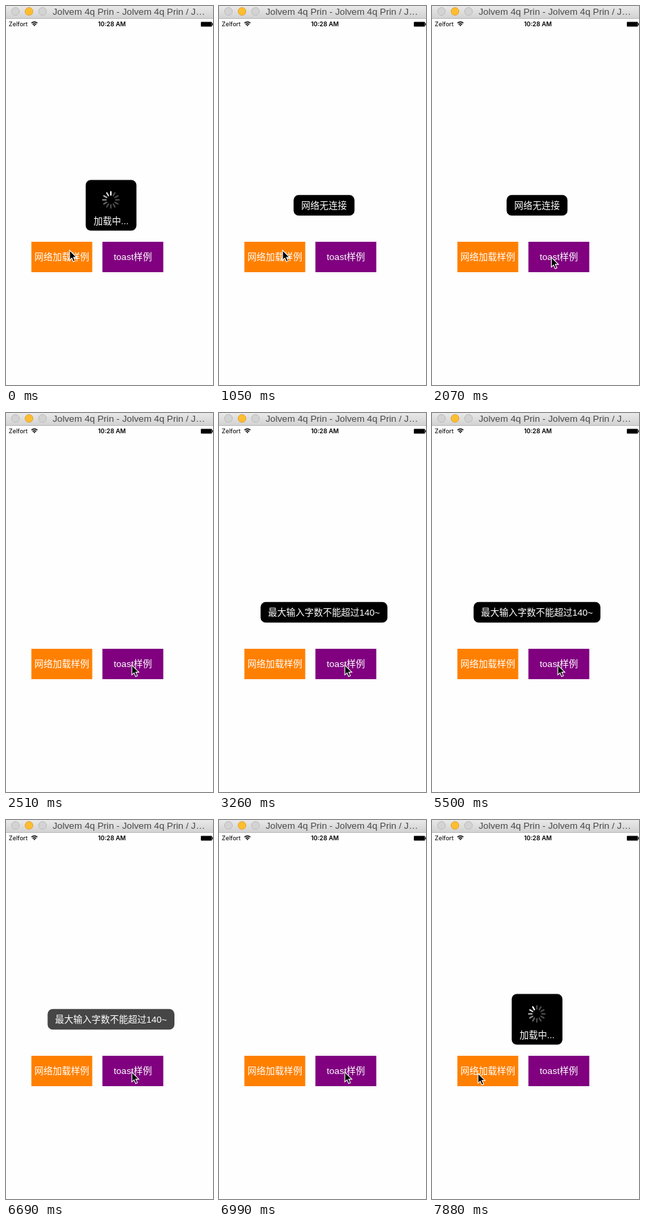
Recreate the animation shown at these times as an HTML page. Size 306x561 px, loop 8 s.

```html
<!DOCTYPE html>
<html lang="zh-CN">
<head>
<meta charset="utf-8">
<title>Toast</title>
<style>
html, body { margin: 0; width: 100%; height: 100%; overflow: hidden; background: #fefefe; }
svg { display: block; }
text { font: 13.5px "Liberation Sans", "Noto Sans CJK SC", "Noto Sans CJK", sans-serif; fill: #fff; text-anchor: middle; }
.bar text { font-size: 13.7px; fill: #484848; text-anchor: start; }
.status text { font: 9px Inter, sans-serif; fill: #000; }
</style>
</head>
<body>
<svg width="306" height="561" viewBox="0 0 306 561">
  <defs>
    <linearGradient id="chrome" x2="0" y2="1">
      <stop stop-color="#e9e9e9"/><stop offset="1" stop-color="#d1d1d1"/>
    </linearGradient>
  </defs>

  <g class="bar">
    <rect width="306" height="19" fill="url(#chrome)"/>
    <rect y="18" width="306" height="1" fill="#b9b9b9"/>
    <g fill="#d3d3d3" stroke="#bcbcbc">
      <circle cx="14" cy="8" r="5.8"/>
      <circle cx="34" cy="8" r="5.8" fill="#fdbd30" stroke="#e2a336"/>
      <circle cx="54" cy="8" r="5.8"/>
    </g>
    <text x="69" y="13">Jolvem 4q Prin - Jolvem 4q Prin / J…</text>
  </g>

  <g class="status">
    <text x="4" y="30" style="text-anchor:start">Zelfort</text>
    <g fill="none" stroke="#000" stroke-width="1.5">
      <path d="M37.6 25.3Q42 21.6 46.4 25.3M39.4 27.3Q42 25.2 44.6 27.3"/>
      <path d="M40.4 28.3Q42 27 43.6 28.3L42 30Z" fill="#000" stroke="none"/>
    </g>
    <text x="156.5" y="30" style="font-weight:600">10:28 AM</text>
    <rect x="288" y="23.5" width="16.5" height="7" rx="1"/>
    <rect x="305" y="25.5" width="1" height="3"/>
  </g>

  <rect x="37.5" y="349" width="90" height="45" fill="#ff8000"/>
  <text x="82.5" y="376">网络加载样例</text>
  <rect x="142.5" y="349" width="90" height="45" fill="#800080"/>
  <text x="187.5" y="376">toast样例</text>

  <g id="loader">
    <rect x="117.8" y="257.5" width="75" height="75" rx="7.5"/>
    <g id="spinner" transform="translate(155 287)" stroke="#fff" stroke-width="2.1" stroke-linecap="round"></g>
    <text x="155.3" y="322.5">加载中...</text>
  </g>
  <g id="offline">
    <rect x="110.3" y="279.7" width="90" height="30.6" rx="7.5"/>
    <text x="155.3" y="300">网络无连接</text>
  </g>
  <g id="limit">
    <rect x="61.5" y="279.7" width="187.5" height="30.6" rx="7.5"/>
    <text x="155.3" y="300">最大输入字数不能超过140~</text>
  </g>

  <path id="cursor" d="M0 0V14.6L3.3 11.6L5.6 17L8.2 15.9L5.9 10.6H10.4Z" stroke="#fff" stroke-width="1.1"/>
</svg>
<script>
const LOOP = 8000, STEP = 150, HOLD = 1190;
const marks = [0, 1490, 2510, 3260, 4450, 5500, 6690, 7430, 7730];
const el = id => document.getElementById(id);
const clamp = v => Math.min(1, Math.max(0, v));
const ease = (t, from, to) => {
  const p = clamp((t - from) / (to - from));
  return p * p * (3 - 2 * p);
};

const spokes = Array.from({ length: 12 }, (_, i) => {
  const line = document.createElementNS("http://www.w3.org/2000/svg", "line");
  line.setAttribute("y1", -7.2);
  line.setAttribute("y2", -12);
  line.setAttribute("transform", `rotate(${i * 30})`);
  el("spinner").append(line);
  return line;
});

// The screen updates in steps, counted anew from each mark.
function snap(t) {
  const mark = marks.findLast(m => m <= t);
  return mark + Math.floor((t - mark) / STEP) * STEP;
}

// Appears at once, holds, then fades out.
function toastAlpha(t, start) {
  const left = t - start - HOLD;
  if (t < start) return 0;
  return left < 0 ? 1 : clamp(0.72 - left / 375);
}

function draw(t) {
  const second = t >= 7730;
  el("loader").style.display = t < 1050 || second ? "" : "none";
  const head = Math.floor(second ? 11 + (t - 7880) * 0.012 : t * 0.012);
  spokes.forEach((line, i) => {
    const age = (head - i + 24) % 12;
    line.setAttribute("stroke-opacity", Math.max(0.3, 1 - age * 0.15));
  });

  el("offline").setAttribute("opacity", toastAlpha(t, 1050));
  el("limit").setAttribute("opacity", toastAlpha(t, t < 5500 ? 3260 : 5500));

  const out = ease(t, 1340, 2090), back = ease(t, 6990, 7430);
  const x = 94 + 92 * out - 118 * back;
  const y = 361.5 + 11.5 * out + 2 * back;
  el("cursor").setAttribute("transform", `translate(${x} ${y})`);
}

const begin = performance.now();
function frame() {
  draw(snap((performance.now() - begin) % LOOP));
  requestAnimationFrame(frame);
}
frame();
</script>
</body>
</html>
```
